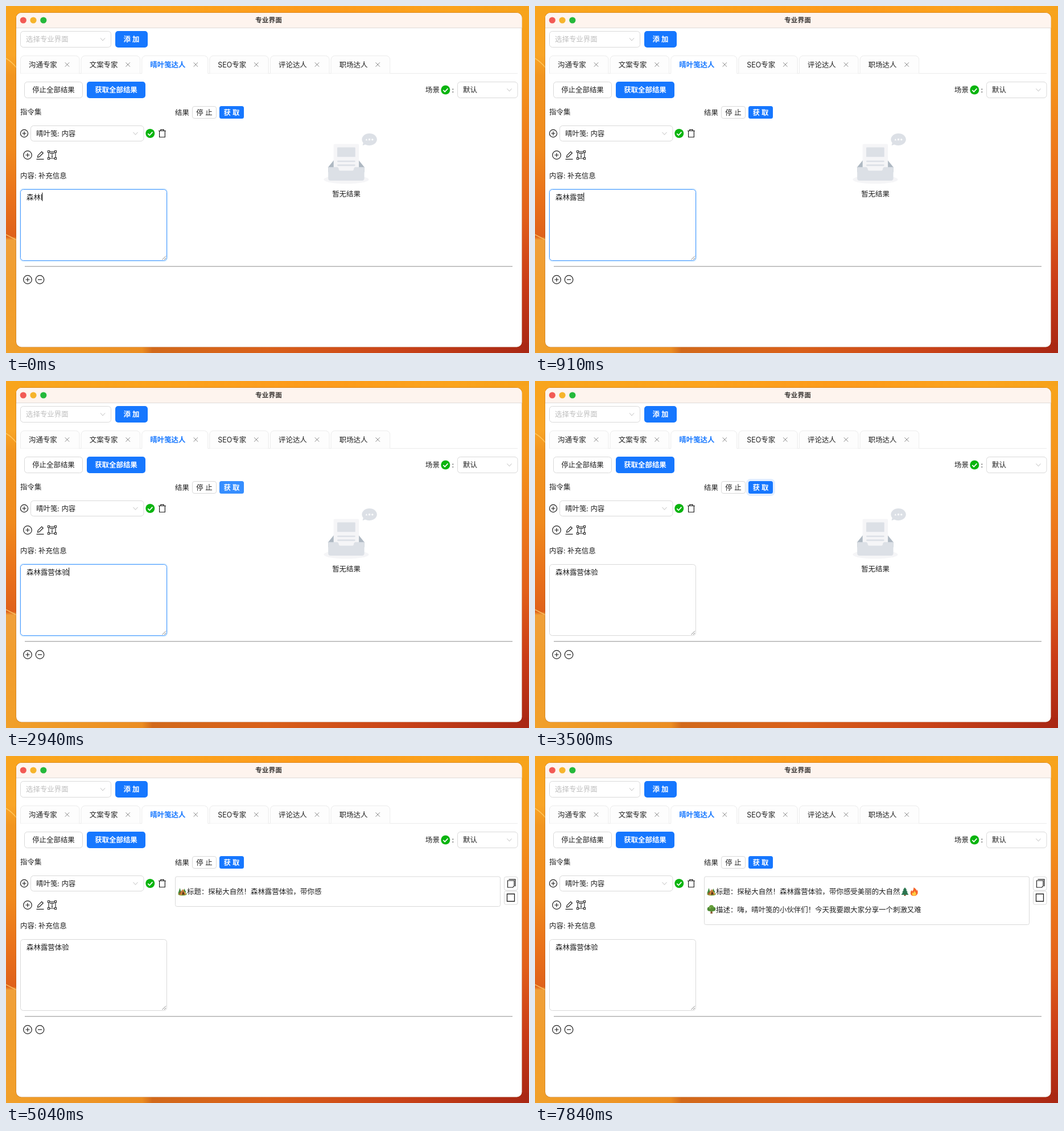
These frames come from a looping animation (919 by 610 pixels, 8 s). An HTML page:

```html
<!DOCTYPE html>
<html lang="zh-CN">
<head>
<meta charset="utf-8">
<title>专业界面</title>
<style>
html, body { margin: 0; width: 100%; height: 100%; overflow: hidden; background: #f49a20; }
svg { display: block; width: 919px; height: 610px; }
text { font-family: Inter, "Noto Sans CJK SC", "Noto Sans CJK", sans-serif; font-size: 12.45px; white-space: pre; }
</style>
</head>
<body>
<svg id="stage" viewBox="0 0 919 610" xmlns="http://www.w3.org/2000/svg"></svg>
<script>
const LOOP = 8000;
const BLUE = '#1677ff', INK = '#1f1f1f', LINE = '#d9d9d9';
const BRAND = '晴叶笺';

// ---- drawing helpers ----
const text = (x, cy, s, { fill = INK, weight = 400, anchor = 'start', size = 12.45, id = '' } = {}) =>
  `<text id="${id}" x="${x}" y="${cy + size * .375}" fill="${fill}" font-weight="${weight}"
    text-anchor="${anchor}" style="font-size:${size}px">${s}</text>`;
const box = (x, y, w, h, r = 5, fill = '#fff', stroke = LINE, extra = '') =>
  `<rect x="${x}" y="${y}" width="${w}" height="${h}" rx="${r}" fill="${fill}" stroke="${stroke}" ${extra}/>`;
const path = (d, stroke = INK, width = 1.2, fill = 'none') =>
  `<path d="${d}" fill="${fill}" stroke="${stroke}" stroke-width="${width}"/>`;
const disc = (x, y, r, fill) => `<circle cx="${x}" cy="${y}" r="${r}" fill="${fill}"/>`;
const at = (x, y, s, id = '') => `<g id="${id}" transform="translate(${x} ${y})">${s}</g>`;
const button = (x, y, w, h, label, primary, r = 5, id = '') =>
  (primary ? box(x, y, w, h, r, BLUE, 'none', `id="${id}"`) : box(x + .5, y + .5, w - 1, h - 1, r)) +
  text(x + w / 2, y + h / 2, label, { fill: primary ? '#fff' : INK, weight: primary ? 600 : 400, anchor: 'middle' });
const chevron = (x, y) => path(`M${x - 4} ${y - 2.2}l4 4.6 4-4.6`, '#bfbfbf', 1);
const select = (x, y, w, h, label, fill) =>
  box(x + .5, y + .5, w - 1, h - 1) + text(x + 10, y + h / 2, label, { fill }) + chevron(x + w - 15, y + h / 2);
const ring = (x, y, r, plus) =>
  `<circle cx="${x}" cy="${y}" r="${r}" fill="none" stroke="${INK}" stroke-width="1.2"/>` +
  path(`M${x - 3.6} ${y}h7.2` + (plus ? `M${x} ${y - 3.6}v7.2` : ''));
const check = (x, y) => disc(x, y, 8, '#0ab40f') + path(`M${x - 4} ${y + .3}l2.9 3 5.2-5.6`, '#fff', 1.8);

// ---- pieces ----
const strip = (id, dir, stops) => `<linearGradient id="${id}" ${dir}>` +
  stops.map(([o, c]) => `<stop offset="${o}" stop-color="${c}"/>`).join('') + '</linearGradient>';
const DOWN = 'x1="0" y1="0" x2="0" y2="1"';

const wallpaper = `<defs>
  ${strip('top', '', [[0, '#f8a51d'], [.3, '#fca31d'], [.6, '#fd9a1b'], [.85, '#fba31c'], [1, '#f6a21b']])}
  ${strip('left', DOWN, [[0, '#f9a41d'], [.13, '#f9a526'], [.19, '#f2951f'], [.4, '#f08a1d'], [.55, '#e9711a'], [.66, '#df611a'], [.67, '#f0a03a'], [.8, '#f19d2c'], [1, '#f2a02a']])}
  ${strip('right', DOWN, [[0, '#f8a41c'], [.2, '#f5951c'], [.4, '#ee7a1b'], [.6, '#e2601a'], [.8, '#c93c17'], [1, '#a82613']])}
  ${strip('bottom', '', [[0, '#f1a02a'], [.26, '#eb8d22'], [.28, '#d2691b'], [.5, '#d9601a'], [.75, '#c94318'], [1, '#a92714']])}
  ${strip('paper', DOWN, [[0, '#fff'], [1, '#fafafa']])}
  </defs>
  <rect width="919" height="610" fill="url(#top)"/>
  <rect y="8" width="30" height="602" fill="url(#left)"/>
  <rect x="895" y="8" width="24" height="602" fill="url(#right)"/>
  <rect y="592" width="919" height="18" fill="url(#bottom)"/>
  ${path('M0 92Q10 98 18 108', '#ffc45a', 1.5)}${path('M0 402l18 9', '#f8bd62', 1.5)}`;

const frame = `<rect x="17.5" y="11.5" width="889.5" height="588.5" rx="9.5" fill="#7a3a10" opacity=".45"/>
  <rect x="18" y="12" width="888.5" height="587.5" rx="9" fill="#fff"/>
  <path d="M18 38V21a9 9 0 0 1 9-9h870.500a9 9 0 0 1 9 9v17z" fill="#fef4ee"/>
  <path d="M18 38.500h888.500" stroke="#dedad7"/>` +
  disc(30.3, 25, 5.6, '#f25a55') + disc(48, 25, 5.6, '#f6b42c') + disc(65.8, 25, 5.6, '#25b93b') +
  text(461.5, 24.5, '专业界面', { fill: '#3c3836', weight: 600, anchor: 'middle', size: 11.7 });

const tab = ([x, w, label], i) => {
  const on = i === 2, c = x + w - 22, r = x + w;
  return path(`M${x + .5} 118.500V94a6.500 6.500 0 0 1 6.500-6.500H${r - 7}a6.500 6.500 0 0 1 6.500 6.500V118.500`, '#ececec', 1, on ? '#fff' : '#fdfdfd') +
    (on ? `<path d="M${x + 1} 118.500H${r - 1}" stroke="#fff" stroke-width="2"/>` : '') +
    text(x + 15, 103, label, { fill: on ? BLUE : INK, weight: on ? 600 : 400 }) +
    path(`M${c - 3.7} 99.300l7.400 7.400m0-7.400l-7.400 7.400`, '#858585', 1);
};
const tabs = path('M25 118.500H899', '#ececec', 1) + [
  [25, 104.5, '沟通专家'], [131.7, 104.5, '文案专家'], [238.3, 117, BRAND + '达人'],
  [357.3, 104.5, 'SEO专家'], [464, 104.5, '评论达人'], [570.7, 104.5, '职场达人']
].map(tab).join('');

const trash = path('M268 219.500h13M271.700 219v-1.700h5.600v1.700M269.600 220v10.500h9.800V220');
const pencil = path('M53.500 269.400h13M55.500 266l.6-3.300 6.600-6.700 2.600 2.500-6.700 6.700z');
const frameT = path('M75 256h12v12H75zM78 260v-1.500h6v1.500M81 258.500v7M79.700 265.500h2.600', INK, 1.1) +
  [[75, 256], [87, 256], [75, 268], [87, 268]].map(([x, y]) => box(x - 1.6, y - 1.6, 3.2, 3.2, 0, '#fff', INK)).join('');

const emptyArt = at(598, 330, text(0, 0, '暂无结果', { anchor: 'middle' })) +
  `<g transform="translate(544.2 224) scale(.585)"><g transform="translate(24 31.67)">
  <ellipse cx="67.8" cy="106.9" rx="67.8" ry="12.7" fill="#f5f5f7"/>
  <path d="M122 69.700L98.100 40.200q-2-2.200-4.600-2.200H42q-2.600 0-4.600 2.200L13.600 69.700V85H122z" fill="#aeb8c2"/>
  <rect x="29.8" width="76" height="101.300" rx="4" fill="#f5f5f7"/>
  <g fill="#dce0e6"><rect x="40.700" y="10" width="54.200" height="29" rx="2"/>
  <rect x="40.700" y="49.800" width="54.200" height="4.500" rx="2.200"/><rect x="40.700" y="61.500" width="54.200" height="4.500" rx="2.200"/>
  <path d="M13.600 69.700h26.300c3 0 5.200 2.400 5.200 5.400s2.400 5.400 5.300 5.400h34.800c3 0 5.300-2.400 5.300-5.400s2.300-5.400 5.200-5.400H122v33.600q-.4 6.700-7 7.100H20.500q-6.500-.4-6.900-7.100z"/></g></g>
  <path d="M149.100 33.300l-6.800 2.600a1 1 0 0 1-1.300-1.200l1.900-6.200c-2.600-2.900-4.100-6.500-4.100-10.400C138.800 8.100 148.900 0 161.400 0S184 8.100 184 18.100 173.900 36.200 161.400 36.200c-4.500 0-8.700-1.100-12.300-2.900z" fill="#dce0e6"/>
  <path d="M149.600 21h5.700l-2.800-5zM158.900 16h5v5h-5z" fill="#fff"/><circle cx="170.300" cy="18.500" r="2.800" fill="#fff"/></g>`;

// Small pictograms on a 15 x 15 cell
const tent = path('M3 1l3 9H0zM11 2l3 7H8z', 'none', 0, '#3f8a3a') + path('M0 10h15v3q-7 3-15 0z', 'none', 0, '#7cab48') +
  path('M8.500 3l5.500 9.500L3 13.500z', 'none', 0, '#d98b36') + path('M8.500 3L3 13.500 1 11z', 'none', 0, '#a8562a') + path('M8.500 6l3 6.500-5 .6z', 'none', 0, '#54341f');
const pine = path('M6 12h3v3H6z', 'none', 0, '#8a5a32') +
  path('M7.500 0l3.500 4.500H9.500L12.500 8.500H11L14 13H1l3-4.500H2.500l3-4H4z', 'none', 0, '#2c7650');
const flame = path('M7 0q5 3 5 6 1-1 .8-2.300Q15 7 14 10.500 12 15 7.500 15 2 15 1.300 10.500.8 7 3.500 4.500q0 2 1 2.500Q7 4 7 0z', 'none', 0, '#f5652b') +
  path('M8 6q4 4 3.200 6.500Q10 14.700 7.500 14.700 4 14.500 4 11.500 4 9.500 5 8.500q.5 1.500 1.300 1.500Q8 8.500 8 6z', 'none', 0, '#ffcd42');
const oak = path('M6.300 9h2.600l.6 6H5.700z', 'none', 0, '#8b5a34') + disc(4, 7, 3.8, '#4d8934') + disc(11, 7, 3.8, '#4d8934') +
  disc(7.500, 4, 4, '#659f3b') + disc(7.500, 8, 3.6, '#588f35') + disc(5, 5, 1.300, '#86b652');

const copyIcon = box(875.5, 212.5, 23.5, 23.5, 3) + path('M881.500 219v12h9l2.500-2.500V219zM883.500 216.800h11.500V229', INK, 1.2);
const squareIcon = box(875.5, 237.5, 23.5, 23.5, 3) + path('M880.500 242.500h13v13h-13z', INK, 1.3);

const stage = document.getElementById('stage');
stage.innerHTML = wallpaper + frame +
  select(25, 44, 160, 29, '选择专业界面', '#bfbfbf') + button(192, 44, 57, 29, '添 加', true) + tabs +
  button(32, 133, 103, 29, '停止全部结果') + button(142, 133, 103, 29, '获取全部结果', true) +
  text(737, 147.5, '场景') + check(772.3, 147.5) + text(783.5, 147.5, ':') + select(793, 133, 106.5, 29, '默认') +
  text(25, 186, '指令集') + text(297, 187, '结果') + button(327, 176, 43, 22, '停 止', false, 3.5) +
  box(375, 176, 43, 22, 3.5, 'none', BLUE, 'id="wave"') + button(375, 176, 43, 22, '获 取', true, 3.5, 'fetch') +
  ring(32, 224, 6.6, true) + select(43, 210, 199.5, 28, BRAND + ': 内容') + check(253.3, 224) + trash +
  ring(38, 262, 7.3, true) + pencil + frameT + text(25, 298, '内容: 补充信息') +
  box(24.5, 321, 259, 128, 6, 'none', '#0591ff', 'id="glow" stroke-width="2"') +
  box(25.5, 322.5, 257, 125, 5, '#fff', LINE, 'id="area"') + path('M274.500 446l6.500-6.500M278 446l3-3', '#777', .9) +
  text(36, 336, '', { id: 'typed' }) + '<rect id="caret" y="328" width="1" height="15" fill="#111"/>' +
  path('M33 457.800H890', '#8d8d8d', 1) + ring(38, 481, 7.3, true) + ring(59.5, 481, 7.3, false) +
  at(0, 0, emptyArt, 'empty') +
  at(0, 0, box(297.5, 212, 571, 53, 3, '#fff', LINE, 'id="card"') + copyIcon + squareIcon +
    at(302.5, 231, tent) + text(318, 238, '', { id: 'line1' }) +
    at(642.5, 231, pine, 'pine') + at(658.5, 231, flame, 'flame') +
    at(302.5, 262, oak, 'oak') + text(318, 270, '', { id: 'line2' }), 'result') +
  at(0, 0, box(56, 346, 342, 29, 5, '#f6f6f6', '#d0d0d0', 'style="filter:drop-shadow(0 4px 9px #0003)"') +
    box(59, 349, 36, 23, 4, BLUE, 'none') + text(64, 360.5, '', { id: 'first', fill: '#fff' }) +
    text(106, 360.5, '', { id: 'others' }) + path('M384 359l4 4 4-4', '#777', 1), 'ime');

// ---- timeline ----
const typing = [[0, '森林l'], [210, '森林lu'], [420, '森林lu y'], [630, '森林lu yi'], [840, '森林露营'],
  [1120, '森林露营t'], [1260, '森林露营ti y'], [1470, '森林露营体验']];
const choices = [[0, ''], [70, '了来里两啦'], [280, '路录露陆鹿'], [490, '录音露营鹿'], [700, '露营录音路'], [910, ''],
  [1190, '他她它太天'], [1330, '体验提议题'], [1540, '']];
const LINE1 = '标题：探秘大自然！森林露营体验，带你感受美丽的大自然';
const LINE2 = `描述：嗨，${BRAND}的小伙伴们！今天我要跟大家分享一个刺激又难`;
const count1 = [[0, 0], [3920, 2], [4130, 3], [4200, 4], [4270, 6], [4340, 9], [4410, 11], [4830, 12], [4900, 14],
  [4970, 16], [5040, 19], [5320, 21], [5460, 23], [5530, 26]];
const count2 = [[0, 0], [6090, 3], [6440, 5], [6510, 8], [6580, 10], [6720, 11], [7000, 14], [7070, 18],
  [7210, 21], [7560, 23], [7630, 25], [7700, 28], [7840, 29]];

const $ = id => document.getElementById(id);
const last = (table, t) => table.reduce((v, [from, next]) => t >= from ? next : v, table[0][1]);
const ramp = (t, a, b) => Math.min(1, Math.max(0, (t - a) / (b - a)));
const mix = (a, b, k) => `rgb(${a.map((v, i) => Math.round(v + (b[i] - v) * k))})`;
const show = (id, on) => $(id).style.display = on ? '' : 'none';
const NORMAL = [22, 119, 255], HOVER = [64, 150, 255], PRESSED = [9, 88, 217], GREY = [217, 217, 217];

function buttonColor(t) {
  if (t < 3150) return mix(NORMAL, HOVER, ramp(t, 2730, 3010));
  if (t < 3290) return mix(HOVER, PRESSED, ramp(t, 3080, 3220));
  return mix(PRESSED, NORMAL, ramp(t, 3220, 3500));
}

function draw(now) {
  const time = now % LOOP, t = Math.floor(time / 70) * 70;
  const blur = ramp(t, 3080, 3360);

  $('typed').textContent = last(typing, t);
  $('caret').setAttribute('x', 36 + $('typed').getComputedTextLength() - .5);
  show('caret', t < 2100 || (t >= 2590 && t < 3150));
  $('area').setAttribute('stroke', mix(HOVER, GREY, blur));
  $('glow').style.opacity = .1 * (1 - blur);

  const list = last(choices, t);
  show('ime', list);
  $('ime').style.opacity = t === 840 || t === 1470 ? .5 : 1;
  $('first').textContent = list ? '1 ' + list[0] : '';
  $('others').textContent = [...list].slice(1).map((c, i) => `${i + 2} ${c}`).join('     ');

  $('fetch').setAttribute('fill', buttonColor(t));
  const wave = ramp(t, 3220, 3920), spread = 5 * (1 - (1 - wave) ** 3);
  $('wave').setAttribute('stroke-width', 2 * spread);
  $('wave').style.opacity = wave > 0 ? .2 * (1 - wave) : 0;

  show('empty', t < 3850);
  show('result', t >= 3850);
  $('card').setAttribute('height', t >= 6020 ? 84.5 : 52.5);
  $('line1').textContent = LINE1.slice(0, last(count1, t));
  $('line2').textContent = LINE2.slice(0, last(count2, t));
  show('pine', t >= 5670);
  show('flame', t >= 5950);
  show('oak', t >= 6020);
}

const start = performance.now();
function tick() {
  draw(performance.now() - start);
  requestAnimationFrame(tick);
}
tick();
</script>
</body>
</html>
```
